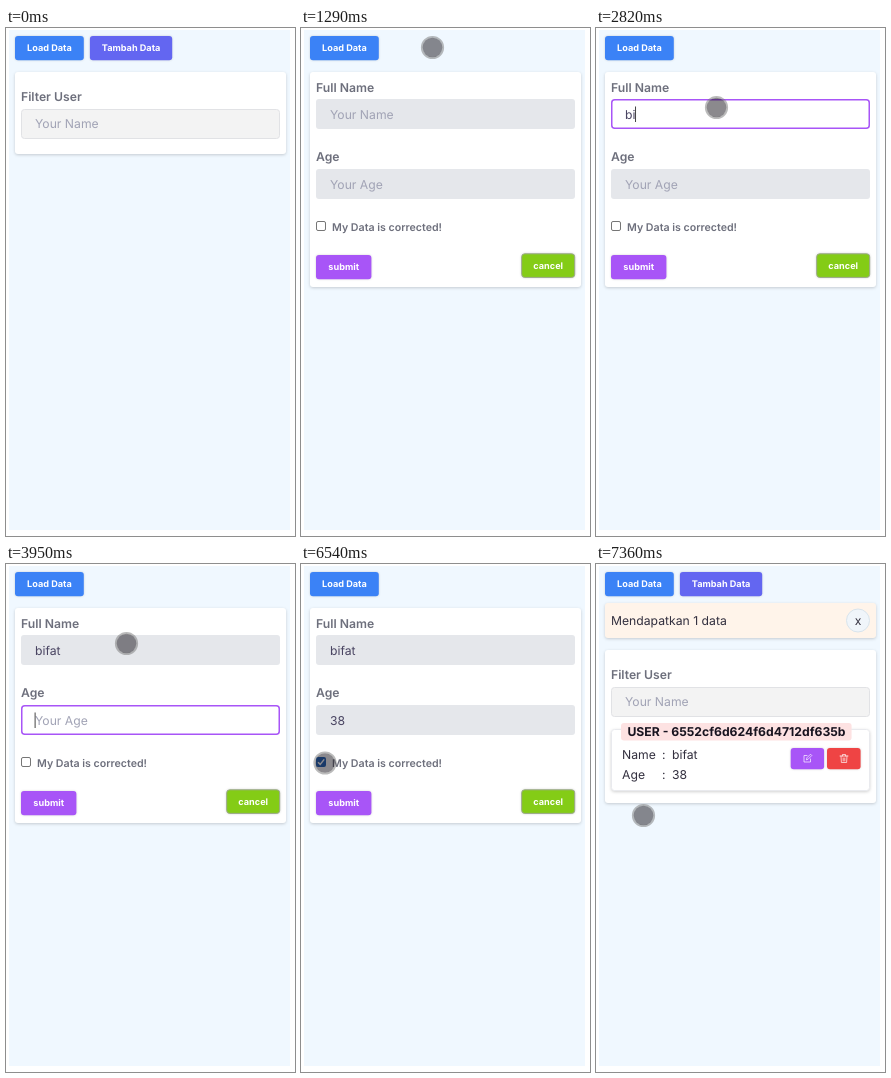
An HTML page that plays this animation: 289 px wide and 508 px high, repeating every 8 s.

```html
<!DOCTYPE html>
<html lang="id">
<head>
<meta charset="utf-8">
<title>User form</title>
<style>
  html, body { margin: 0; width: 100%; height: 100%; overflow: hidden; background: #fff; }
  svg { display: block; width: 289px; height: 508px; }
  text { font: 12.2px Inter, sans-serif; white-space: pre; text-rendering: geometricPrecision; }
  .label { font-weight: 600; fill: #6d6f7c; }
  .small { font-size: 10.65px; }
  .hint { fill: #a1a3b5; }
  .value { fill: #33303f; }
  .entry { fill: #4a4562; }
  .caption { font-size: 9.15px; font-weight: 700; fill: #fff; text-anchor: middle; }
  .legend { font-weight: 700; fill: #17131f; text-anchor: middle; }
  .card { filter: drop-shadow(0 1.5px 1.5px rgba(0, 0, 0, .18)); }
  .raised { filter: drop-shadow(0 .8px .8px rgba(0, 0, 0, .16)); }
  .icon { fill: none; stroke: #fff; stroke-width: .8; stroke-opacity: .85; stroke-linejoin: round; stroke-linecap: round; }
</style>
</head>
<body>
<svg id="stage" viewBox="0 0 289 508"></svg>
<script>
const LOOP = 8000;
const FORM_OPENS = 1220, NAME_FOCUS = 2030, AGE_FOCUS = 3950, CHECKED = 6480, SAVED = 7150;
const NAME = 'bifat', AGE = '38';
const NAME_KEYS = [2690, 2820, 2950, 3150, 3300];
const AGE_KEYS = [5480, 5610];
const CARET_OFF = [[2490, 2690], [3750, 3950], [4480, 4950], [6110, CHECKED]];

// Pointer path: time, x, y
const PATH = [
  [200, 214, 423], [340, 198, 300], [480, 168, 125], [620, 147.5, 46.5], [750, 136, 25],
  [890, 131.5, 19.5], [1290, 131.5, 19.5], [1490, 126, 56], [1630, 122.5, 75.5],
  [1760, 121, 79], [2030, 120.5, 79.5], [6009, 120.5, 79.5], [6010, 122.5, 139.5],
  [6240, 62, 182], [6400, 24, 199], [6540, 24, 199], [6810, 64, 234],
  [6880, 71.5, 239.5], [6950, 68, 240], [7150, 64, 241], [7360, 47.5, 251.5], [LOOP, 47.5, 251.5]
];
const STEP = 68;

const stage = document.getElementById('stage');
const ruler = document.createElement('canvas').getContext('2d');

const between = (t, a, b) => t >= a && t < b;
const text = (x, y, s, cls = 'value') => `<text x="${x}" y="${y}" class="${cls}">${s}</text>`;
const box = (x, y, w, h, fill, attrs = '') =>
  `<rect x="${x}" y="${y}" width="${w}" height="${h}" rx="3" fill="${fill}" ${attrs}/>`;
const card = (y, h, fill = '#fff') => box(9, y, 271, h, fill, 'class="card"');
const button = (x, y, w, h, fill, caption) =>
  box(x, y, w, h, fill, 'class="raised"') + text(x + w / 2, y + h / 2 + 3.1, caption, 'caption');

function typed(word, keys, t) {
  return word.slice(0, keys.filter(k => t >= k).length);
}

function field(y, hint, value, focused, t) {
  const frame = focused
    ? box(15.75, y + .75, 257.5, 28.5, '#fff', 'stroke="#a855f7" stroke-width="1.5"')
    : box(15, y, 259, 30, '#e5e7eb');
  const content = value ? text(29, y + 20, value, 'entry') : text(29, y + 20, hint, 'hint');
  if (!focused || CARET_OFF.some(([a, b]) => between(t, a, b))) return frame + content;
  ruler.font = '12.2px Inter, sans-serif';
  const caretX = 28.6 + ruler.measureText(value).width;
  return frame + content + `<rect x="${caretX}" y="${y + 7.5}" width="1" height="15.5" fill="#444"/>`;
}

function filterBox(y) {
  return text(15, y + 29, 'Filter User', 'label') +
    box(15.5, y + 37.5, 258, 29, '#f3f3f3', 'stroke="#e1e2e5"') +
    text(29, y + 56, 'Your Name', 'hint');
}

function form(t) {
  const done = t >= CHECKED;
  const checkbox = done
    ? `<rect x="15" y="193" width="10" height="10" rx="2" fill="#1a5fb4"/>
       <path d="M17 198.2l2.2 2.2 4-5" fill="none" stroke="#fff" stroke-width="1.5"/>`
    : '<rect x="15.5" y="193.5" width="9" height="9" rx="1.5" fill="#fff" stroke="#767676"/>';
  return card(44, 215) +
    text(15, 64, 'Full Name', 'label') +
    field(71, 'Your Name', typed(NAME, NAME_KEYS, t), between(t, NAME_FOCUS, AGE_FOCUS), t) +
    text(15, 133, 'Age', 'label') +
    field(141, 'Your Age', typed(AGE, AGE_KEYS, t), between(t, AGE_FOCUS, CHECKED), t) +
    checkbox + text(31, 203, 'My Data is corrected!', 'label small') +
    button(15, 227, 55.4, 24.2, '#a855f7', 'submit') +
    box(220.7, 225.8, 53, 23.6, '#84cc16', 'class="raised" stroke="#9ba78c"') +
    text(247.2, 241, 'cancel', 'caption');
}

function row(y, name, value) {
  return text(26, y, name) + text(66, y, ':') + text(76, y, value);
}

function results() {
  return card(39, 35, '#fff4ea') + text(15, 61, 'Mendapatkan 1 data') +
    '<circle cx="262" cy="56.5" r="11.5" fill="#f0f5fa" stroke="#d9e4ec"/>' +
    '<text x="262" y="61" text-anchor="middle" class="value">x</text>' +
    card(86, 153) + filterBox(86) +
    box(15.5, 165.5, 258, 61, '#fff', 'class="card" stroke="#e9eaee"') +
    box(25, 159, 230.6, 17.4, '#fde2e2') +
    text(140.5, 172, 'USER - 6552cf6d624f6d4712df635b', 'legend') +
    row(195, 'Name', NAME) + row(215, 'Age', AGE) +
    box(194.7, 184, 33.4, 21.2, '#a855f7', 'class="raised"') +
    '<path class="icon" d="M211 191.5h-3v6.5h6.5v-3M210.5 195.5l.4-1.7 3.6-3.6 1.3 1.3-3.6 3.6z"/>' +
    box(231, 184, 33.6, 21.2, '#ef4444', 'class="raised"') +
    '<path class="icon" d="M244 192h8M246.5 192v-1.5h3v1.5M245 192l.4 6.5h5.2l.4-6.5M247.2 194v3M248.8 194v3"/>';
}

function pointer(t) {
  const i = PATH.findIndex(([end]) => t < end);
  if (i < 1) return '';
  const [t0, x0, y0] = PATH[i - 1], [t1, x1, y1] = PATH[i];
  const p = Math.floor((t - t0) / STEP) * STEP / (t1 - t0);
  return `<g transform="translate(${x0 + (x1 - x0) * p} ${y0 + (y1 - y0) * p})">
    <circle r="9.8" fill="rgba(24,20,28,.5)"/>
    <circle r="10.6" fill="none" stroke="rgba(120,120,120,.5)" stroke-width="2"/></g>`;
}

function scene(t) {
  const editing = between(t, FORM_OPENS, SAVED);
  const page = editing ? form(t) : t >= SAVED ? results() : card(44, 82) + filterBox(44);
  return '<rect x="3" y="2" width="281" height="500" fill="#f0f8ff"/>' +
    button(9, 8, 68.8, 24.3, '#3b82f6', 'Load Data') +
    (editing ? '' : button(83.9, 8, 82.3, 24.3, '#6366f1', 'Tambah Data')) +
    page + pointer(t);
}

let shown = '';
function tick() {
  const next = scene(performance.now() % LOOP);
  if (next !== shown) stage.innerHTML = shown = next;
  requestAnimationFrame(tick);
}
tick();
</script>
</body>
</html>
```
